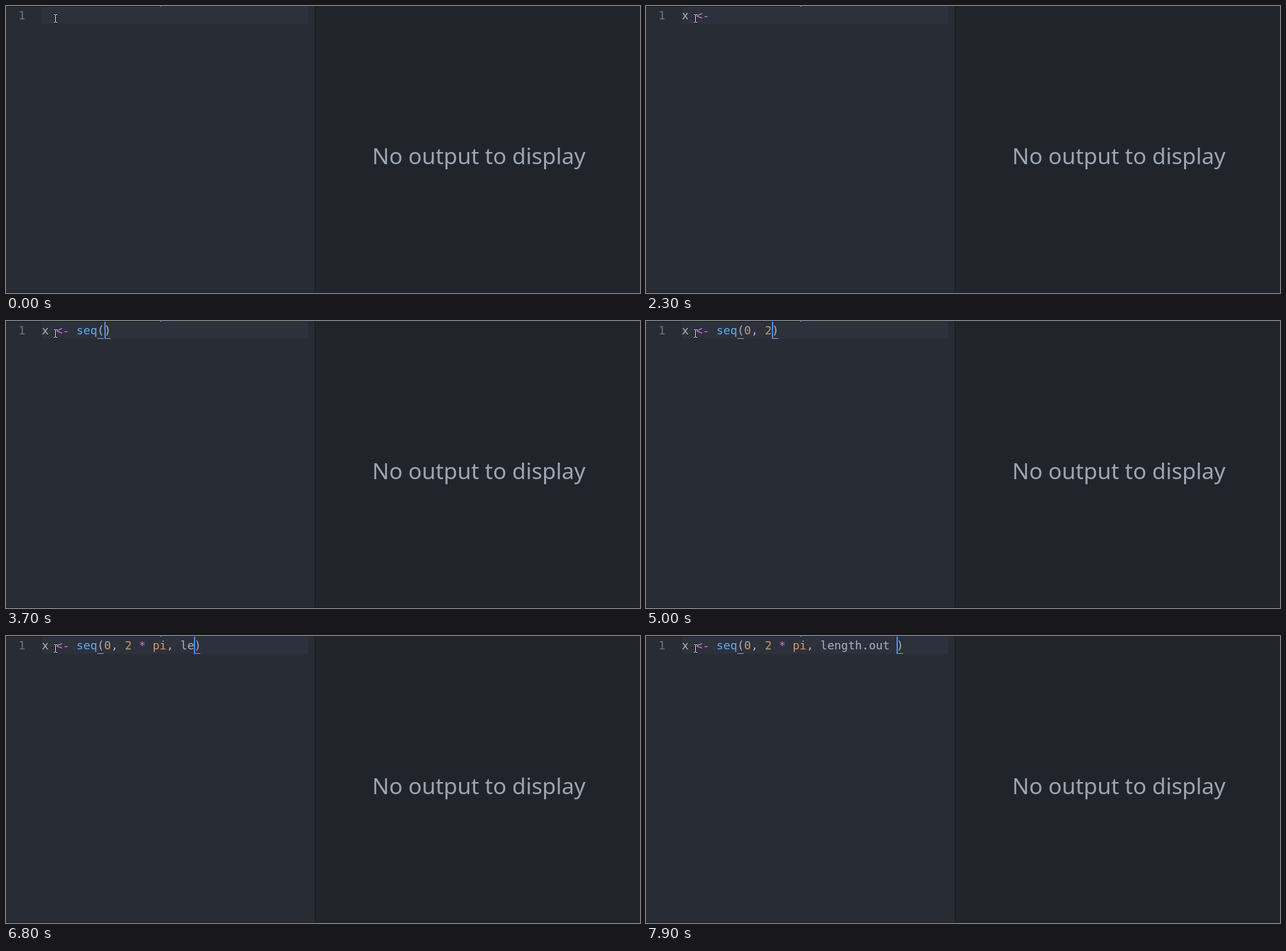
Animation of 992 by 450 pixels, one loop 8 s. Source, as an HTML page:

```html
<!DOCTYPE html>
<html lang="en">
<head>
<meta charset="utf-8">
<title>Typing in an R editor</title>
<style>
  html, body { margin: 0; width: 100%; height: 100%; overflow: hidden; background: #282c34; }
  svg { display: block; }
  text { white-space: pre; fill: #abb2bf; font: 18px "DejaVu Sans Mono", monospace; }
  .number { fill: #6e7686; }
  .operator { fill: #c678dd; }
  .constant { fill: #d19a66; }
  .call { fill: #61afef; }
  .message { fill: #9da5b4; font: 34.85px "Noto Sans", sans-serif; }
  .item { fill: #9da5b4; }
  .match { fill: #d7dae0; font-weight: bold; }
  .selected .match { fill: #fff; }
  .popup { filter: drop-shadow(0 2px 3px rgba(0, 0, 0, .4)); }
</style>
</head>
<body>
<svg width="992" height="450" viewBox="0 0 992 450">
  <defs><path id="beam" d="M75 13.5h2M78 13.5h2M77.5 14v11M75 25.5h2M78 25.5h2"/></defs>
  <rect width="992" height="450" fill="#282c34"/>
  <rect x="56" y="1" width="417" height="27" fill="#2c313c"/>
  <rect width="241" height="1" fill="#181a1f"/>
  <rect id="mark" x="241" width="2" height="1"/>
  <rect x="484" width="508" height="450" fill="#21252b"/>
  <rect x="483" width="1" height="450" fill="#181a1f"/>
  <rect y="449" width="992" height="1" fill="#1b1d23"/>
  <text class="message" x="573" y="248">No output to display</text>
  <text class="number" x="19.5" y="21">1</text>
  <g id="editor"></g>
  <g id="popup"></g>
  <use href="#beam" stroke="#111" stroke-width="3"/>
  <use href="#beam" stroke="#fff"/>
</svg>
<script>
const LOOP = 8000, LEFT = 56, CHAR = 18 * 0.60205, ROW = 37, TOP = 28, MAX_HEIGHT = 360;
const byId = id => document.getElementById(id);
const columnX = column => LEFT + column * CHAR;
const escape = s => s.replace(/&/g, '&amp;').replace(/</g, '&lt;');
const span = (name, s) => `<tspan class="${name}">${escape(s)}</tspan>`;

const setters = ['Date', 'difftime', 'factor', 'POSIXct', 'POSIXlt'].map(c => `\`length<-.${c}\``);
const lengthItems = ['length', 'length.POSIXlt', '`length<-`', ...setters, 'lengths'];
const popups = {
  se: { column: 5, match: 'se', items: ['search', 'searchpaths', 'seek', 'seek.connection', 'seq',
        'seq_along', 'seq_len', 'seq.Date', 'seq.default', 'seq.int'] },
  le: { column: 20, match: 'le', items: [...lengthItems, 'letters'] },
  lengt: { column: 20, match: 'lengt', items: lengthItems },
  dot: { column: 20, match: 'length.', items: ['length.POSIXlt'] }
};

// [start ms, typed text, cursor visible, popup]
const call = 'x <- seq(', arg = call + '0, 2 * pi, ';
const steps = [
  [0, '', false], [300, 'x', false], [1200, '', true], [1500, 'x', true],
  [1700, 'x ', true], [1800, 'x <', true], [1900, 'x <-', true], [2000, 'x <- ', true],
  [2300, 'x <- ', false], [2700, 'x <- ', true],
  [3000, 'x <- s', true], [3100, 'x <- se', true], [3300, 'x <- seq', true],
  [3400, 'x <- seq', true, 'se'], [3600, call, true, 'se'], [3700, call, true],
  [4000, call + '0', true], [4200, call + '0,', true], [4300, call + '0, ', true],
  [4600, call + '0, ', false], [5000, call + '0, 2', true], [5300, call + '0, 2', false],
  [5500, call + '0, 2 ', true], [5700, call + '0, 2 *', true], [5900, call + '0, 2 * ', true],
  [6000, call + '0, 2 * p', true], [6200, call + '0, 2 * pi', true],
  [6500, call + '0, 2 * pi,', true], [6600, arg, true], [6700, arg + 'l', true],
  [6800, arg + 'le', true], [6900, arg + 'len', true, 'le'], [7000, arg + 'lengt', true, 'le'],
  [7200, arg + 'length', true, 'lengt'], [7300, arg + 'length.', true, 'lengt'],
  [7400, arg + 'length.', true, 'dot'], [7500, arg + 'length.o', true, 'dot'],
  [7700, arg + 'length.ou', true], [7800, arg + 'length.out', true], [7900, arg + 'length.out ', true]
];

function highlight(code) {
  return code.split(/(<-?|\*|\d|\bpi\b|seq(?=\())/).map(part => {
    if (/^(<-?|\*)$/.test(part)) return span('operator', part);
    if (/^(\d|pi)$/.test(part)) return span('constant', part);
    return part === 'seq' && code.includes('(') ? span('call', part) : escape(part);
  }).join('');
}

function drawEditor(typed, cursorOn) {
  const open = typed.indexOf('('), caret = columnX(typed.length);
  const underline = column =>
    `<rect x="${Math.round(columnX(column))}" y="27" width="10" height="1" fill="#9da5b4"/>`;
  let out = `<text x="${LEFT}" y="21">${highlight(open < 0 ? typed : typed + ')')}</text>`;
  if (open >= 0) out += underline(open) + underline(typed.length);
  if (cursorOn) out += `<rect x="${Math.round(caret)}" y="1" width="2" height="27" fill="#528bff"/>`;
  return out;
}

function drawPopup({ column, match, items }) {
  const textX = columnX(column), x = Math.round(textX) - 50;
  const height = Math.min(items.length * ROW, MAX_HEIGHT);
  const longest = Math.max(...items.map(s => s.length));
  const width = Math.round(74 + longest * CHAR);
  const rows = items.map((item, i) => {
    const y = i * ROW, at = item.indexOf(match), end = at + match.length;
    return `<g class="${i ? '' : 'selected'}">
      <circle cx="18" cy="${y + 19}" r="12.5" fill="#6494ed"/>
      <text class="item" x="${textX - x}" y="${y + 24}">${escape(item.slice(0, at))}${
        span('match', match)}${escape(item.slice(end))}</text></g>`;
  }).join('');
  return `<g class="popup"><svg x="${x}" y="${TOP}" width="${width}" height="${height}">
    <rect width="${width}" height="${height}" rx="2" fill="#24272f"/>
    <rect width="${width}" height="${ROW}" fill="#3a3f4b"/>
    <rect width="36" height="${height}" fill="#2f343d"/>${rows}</svg></g>`;
}

let shown;
function render() {
  const time = performance.now() % LOOP;
  const step = steps.findLast(([start]) => start <= time);
  if (step !== shown) {
    shown = step;
    const [start, typed, cursorOn, popup] = step;
    byId('editor').innerHTML = drawEditor(typed, cursorOn);
    byId('popup').innerHTML = popup ? drawPopup(popups[popup]) : '';
    byId('mark').setAttribute('fill', start < 300 ? '#6b7280' : '#528bff');
  }
  requestAnimationFrame(render);
}
render();
</script>
</body>
</html>
```
